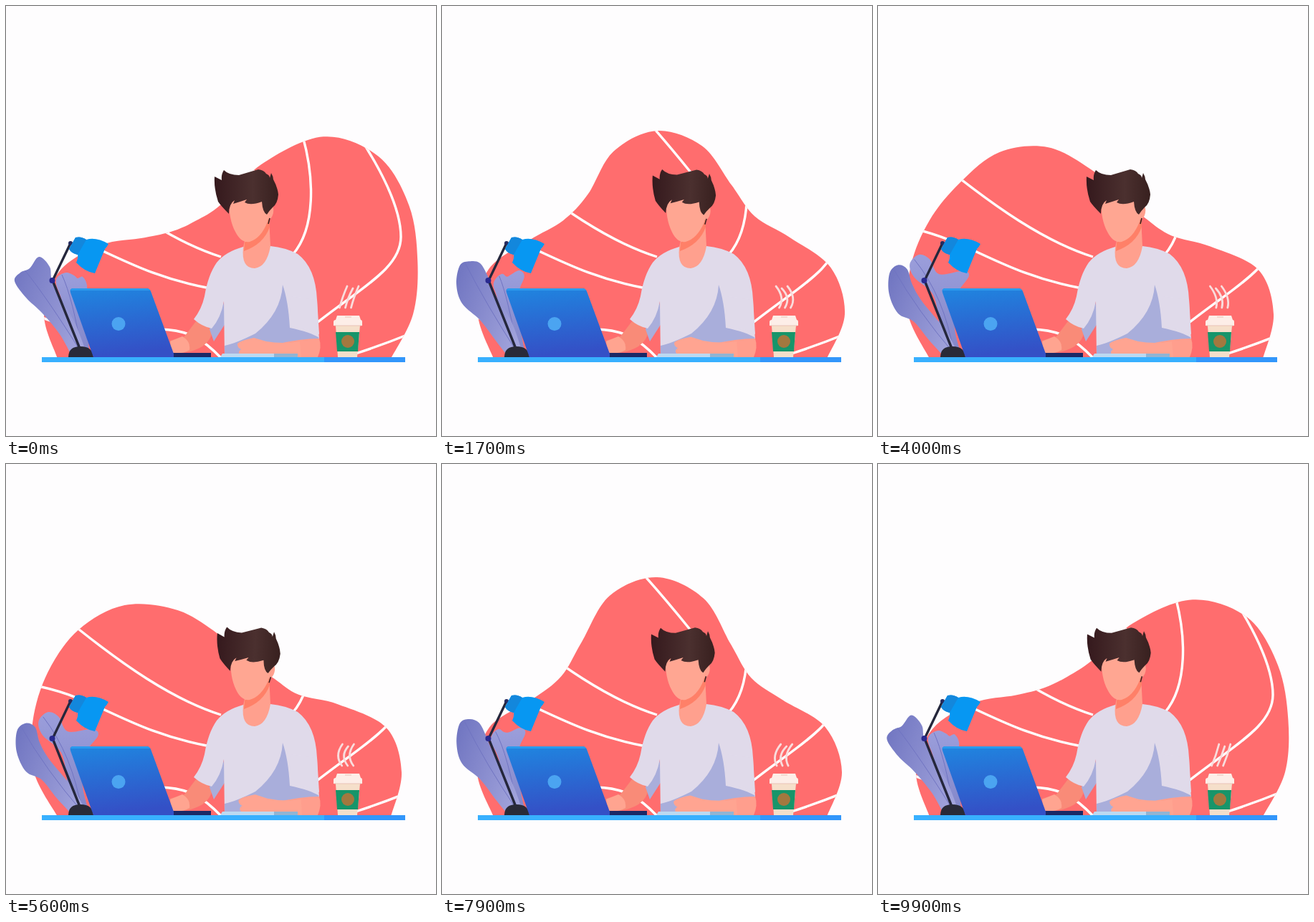
Write an HTML page that moves like this. It is 600 by 600 pixels and loops after 10 s.

```html
<!DOCTYPE html>
<html lang="en">
<head>
<meta charset="utf-8">
<title>Working at a desk</title>
<style>
html, body { margin: 0; width: 100%; height: 100%; overflow: hidden; background: #fefdfe; }
svg { display: block; width: 100vw; height: 100vh; }
.line { fill: none; stroke: #fff; stroke-width: 3.4; }
.rib { fill: none; stroke: #7074c2; stroke-width: 1; }
</style>
</head>
<body>
<svg viewBox="0 0 600 600">
  <defs>
    <clipPath id="clip"><path id="edge"/></clipPath>
    <linearGradient id="leafFront" x1="0" y1=".2" x2="1" y2=".7">
      <stop stop-color="#7277c2"/><stop offset="1" stop-color="#a2a4dc"/>
    </linearGradient>
    <linearGradient id="leafBack" x1="0" y1="0" x2="0" y2="1">
      <stop stop-color="#9b9edb"/><stop offset="1" stop-color="#8286c9"/>
    </linearGradient>
    <linearGradient id="screen" x1="0" y1="0" x2=".15" y2="1">
      <stop stop-color="#1f86e0"/><stop offset="1" stop-color="#3450c6"/>
    </linearGradient>
    <linearGradient id="hair" x1="0" y1="0" x2="1" y2="0">
      <stop stop-color="#35191d"/><stop offset=".6" stop-color="#4b302f"/><stop offset="1" stop-color="#38201f"/>
    </linearGradient>
  </defs>

  <path id="blob" fill="#ff6d6e"/>
  <g class="line" clip-path="url(#clip)">
    <path d="M80 212L102 231C160 277 230 328 300 350"/>
    <path d="M20 306C120 318 160 370 280 393"/>
    <path d="M270 142Q305 180 347 232"/>
    <path d="M413 178C431 240 432 310 400 347"/>
    <path d="M488 175C520 222 551 280 551 322C551 365 500 390 430 445"/>
    <path d="M488 485Q525 473 562 458"/>
    <path d="M45 432Q60 440 75 442M215 451C255 452 275 465 300 491"/>
  </g>

  <path id="back" fill="url(#leafBack)"/><path id="backRib" class="rib"/>
  <path id="front" fill="url(#leafFront)"/><path id="frontRib" class="rib"/>

  <!-- lamp -->
  <path d="M103 478L65 383L90 331" fill="none" stroke="#25273c" stroke-width="3.4"/>
  <path d="M87 490Q87 475 104 475Q121 475 122 490Z" fill="#292a38"/>
  <circle cx="64.500" cy="383" r="4" fill="#29298f"/>
  <circle cx="90" cy="331" r="3" fill="#252b60"/>
  <path d="M97 323Q105 321 112 326Q126 322 143 332Q141 336 138 339L124 373Q110 371 98 358Q101 351 100 347Q91 345 88 339Z" fill="#0797f2"/>
  <path d="M97 323Q105 321 112 326L100 347Q91 345 88 339Z" fill="#1387dc"/>

  <!-- body -->
  <path d="M265 440L288 452Q287 466 274 475Q255 486 232 484L229 467L249 461Z" fill="#f98b78"/>
  <path d="M229 468L246 461Q258 468 256 480Q245 486 231 484Z" fill="#ffa490"/>
  <path d="M300 395L308 440L290 468L284 451Z" fill="#a9aedb"/>
  <path d="M331 336Q306 343 294 358Q282 375 277 405Q273 423 262 437Q273 447 287 450Q300 435 304 412L305 490H400L437 464Q435 444 434 410Q432 365 407 346Q390 337 369 335Z" fill="#e0daea"/>
  <path d="M386 389Q384 428 348 457Q320 471 305 474V490H400L437 463Q425 455 396 449Q394 412 386 389Z" fill="#a9aedb"/>
  <path d="M396 449L397 405L434 410L437 458Q420 447 396 449Z" fill="#e0daea"/>
  <path d="M335 318L331 337Q328 366 347 366Q364 364 369 335L367 296Z" fill="#ffa08e"/>
  <path d="M333 330L368 296V308Q360 332 332 342Z" fill="#ff8068"/>
  <path d="M378 472Q410 464 437 464Q441 476 435 490H375Z" fill="#ff9e8d"/>
  <path id="hand" d="M410 468Q385 472 363 468L346 463Q329 466 323 471Q322 476 328 479Q321 484 330 490H412Z" fill="#ffa491"/>

  <g id="head">
    <ellipse cx="368" cy="288" rx="5" ry="10" fill="#ffa08e" transform="rotate(12 368 288)"/>
    <path d="M311 270Q311 299 320 315Q328 331 340 329Q356 324 365 301L370 265Z" fill="#ffa692"/>
    <path d="M311 290Q300 279 296 273Q290 255 291 238L301 243Q300 235 304 229Q311 236 325 236L352 228Q360 229 363 234Q368 236 368 240L370 233Q373 238 373 242Q379 253 380 263Q379 276 372 281Q367 286 364 291Q358 288 357 273Q341 279 333 274L336 270Q327 273 317 276L319 271Q311 276 311 290Z" fill="url(#hair)"/>
    <path d="M368 296L366 304" stroke="#38201f" stroke-width="1.500"/>
  </g>

  <!-- laptop and book -->
  <path d="M228 484H286V490H228Z" fill="#1b2866"/>
  <path d="M94 394H196Q200 394 202 398L234 485V490H122L90 400Q88 394 94 394Z" fill="url(#screen)"/>
  <path d="M90 397Q90 394 94 394H196Q200 394 201 397Z" fill="#2a9aee"/>
  <circle cx="157" cy="443.500" r="9.500" fill="#4ba4f1"/>
  <path d="M302 485H374V490H299Z" fill="#bcd9f1"/>
  <path d="M374 485H407V490H374Z" fill="#91b4d3"/>

  <!-- cup -->
  <path id="steam" fill="none" stroke="#f9dddd" stroke-width="2.800" stroke-linecap="round"/>
  <path d="M460 446H494L490 490H463Z" fill="#f5dfca"/>
  <path d="M460 455H493L491 482H462Z" fill="#17956a"/>
  <path d="M462 432H493L495 438Q497 438 497 441V446H457V441Q457 438 460 438Z" fill="#fdeee8"/>
  <path d="M458 446H496M473 434H482" stroke="#e9c4b8" stroke-width="1.200"/>
  <circle cx="477" cy="468" r="9" fill="#a3783f"/>

  <path d="M50 490H445V497H50Z" fill="#38b0ff"/>
  <path d="M444 490H557V497H444Z" fill="#3296fb"/>
</svg>
<script>
const $ = id => document.getElementById(id);
const set = (id, d) => $(id).setAttribute('d', d);

// Each pose: position in the sway, then radii every 15 degrees from right to left
const blobPoses = [
  [0, 268, 284, 303, 311, 286, 216, 153, 135, 134, 151, 193, 233, 247],
  [.02, 268, 282, 298, 305, 278, 215, 157, 138, 136, 152, 193, 232, 247],
  [.34, 262, 251, 214, 193, 208, 243, 256, 235, 193, 185, 206, 243, 250],
  [.42, 258, 243, 202, 186, 206, 251, 272, 255, 210, 189, 202, 242, 251],
  [.5, 255, 239, 195, 181, 203, 254, 286, 275, 228, 196, 203, 243, 252],
  [.62, 252, 240, 191, 170, 182, 216, 257, 264, 236, 219, 229, 246, 251],
  [.8, 252, 239, 189, 155, 152, 167, 200, 241, 261, 261, 263, 263, 258],
  [.88, 252, 239, 189, 153, 150, 160, 190, 234, 269, 281, 279, 272, 261],
  [1, 252, 239, 188, 152, 145, 152, 178, 232, 284, 305, 295, 280, 264]
];
// Leaf poses: position in the sway, then x, y pairs
const frontPoses = [
  [0, 75, 458, 50, 428, 28, 407, 12, 384, 20, 372, 33, 366, 46, 350, 61, 364, 66, 388, 95, 440],
  [.38, 75, 468, 54, 440, 28, 416, 21, 388, 26, 360, 40, 355, 54, 360, 64, 378, 72, 398, 97, 440],
  [.62, 72, 466, 50, 440, 28, 428, 17, 402, 18, 374, 28, 361, 40, 366, 50, 388, 64, 412, 94, 450],
  [1, 70, 466, 50, 441, 28, 430, 14, 402, 14, 372, 27, 362, 41, 368, 46, 390, 60, 414, 94, 455]
];
const backPoses = [
  [0, 88, 440, 76, 405, 70, 388, 72, 378, 84, 372, 95, 376, 100, 380, 107, 378, 113, 390, 111, 412, 113, 450],
  [.38, 88, 440, 77, 406, 72, 390, 76, 380, 84, 374, 90, 378, 96, 374, 108, 368, 115, 376, 106, 402, 109, 448],
  [.62, 86, 445, 76, 402, 50, 380, 42, 362, 54, 349, 68, 354, 82, 376, 112, 370, 123, 372, 108, 404, 107, 450],
  [1, 86, 448, 78, 404, 52, 378, 47, 358, 60, 345, 76, 352, 88, 372, 122, 370, 131, 382, 108, 410, 107, 450]
];

function blend(poses, u) {
  const i = Math.max(1, poses.findIndex(p => p[0] >= u));
  const a = poses[i - 1], b = poses[i], k = (u - a[0]) / (b[0] - a[0]);
  return a.slice(1).map((v, j) => v + (b[j + 1] - v) * k);
}
const pairs = v => v.flatMap((x, i) => i % 2 ? [] : [[x, v[i + 1]]]);

// Smooth curve through the points, closed by a straight line
function smooth(p) {
  const at = i => p[Math.min(p.length - 1, Math.max(0, i))];
  let d = 'M' + p[0];
  for (let i = 0; i < p.length - 1; i++) {
    const [a, b, c, e] = [at(i - 1), at(i), at(i + 1), at(i + 2)];
    d += 'C' + [0, 1].map(k => b[k] + (c[k] - a[k]) / 6)
      + ' ' + [0, 1].map(k => c[k] - (e[k] - b[k]) / 6) + ' ' + c;
  }
  return d + 'Z';
}
const triangle = x => 1 - Math.abs(1 - 2 * (x % 1));
const middle = (a, b) => [(a[0] + b[0]) / 2, (a[1] + b[1]) / 2];

function leaf(id, poses, left, right, tip, sides) {
  const p = pairs(blend(poses, sway));
  set(id, smooth([left, ...p, right]));
  set(id + 'Rib', 'M' + middle(p[tip], p[tip + 1]) + 'Q' + middle(p[sides[0]], p[sides[1]]) + ' 106 485');
}

let sway = 0;
function draw(now) {
  const t = Math.floor(now % 10000 / 100) * 100;
  sway = triangle(t / 10000);

  const rim = blend(blobPoses, sway).map((r, i) => {
    const a = i * Math.PI / 12;
    return [300 + r * Math.cos(a), 430 - r * Math.sin(a)];
  });
  const outline = smooth([[537, 492], ...rim, [72, 492]]);
  set('blob', outline);
  set('edge', outline);

  leaf('back', backPoses, [92, 489], [117, 489], 3, [1, 9]);
  leaf('front', frontPoses, [92, 489], [114, 489], 4, [1, 8]);

  const nod = triangle(t / 2000);
  $('head').setAttribute('transform', `rotate(${6 * nod} 340 330)`);
  $('hand').setAttribute('transform', `translate(${4 * nod}) rotate(${4 * nod} 408 472)`);

  const w = t / 2500 * 2 * Math.PI, bend = -11 * Math.sin(w), lean = 7 * Math.cos(w);
  set('steam', [0, 1, 2].map(i => {
    const x = 469 + 8 * i;
    return `M${x - lean / 2} 421Q${x + bend} 407 ${x + lean} ${i == 1 ? 394 : 391}`;
  }).join(''));

  requestAnimationFrame(draw);
}
const start = performance.now();
const tick = draw;
draw = now => tick(Math.max(0, now - start));
draw(start);
</script>
</body>
</html>
```
